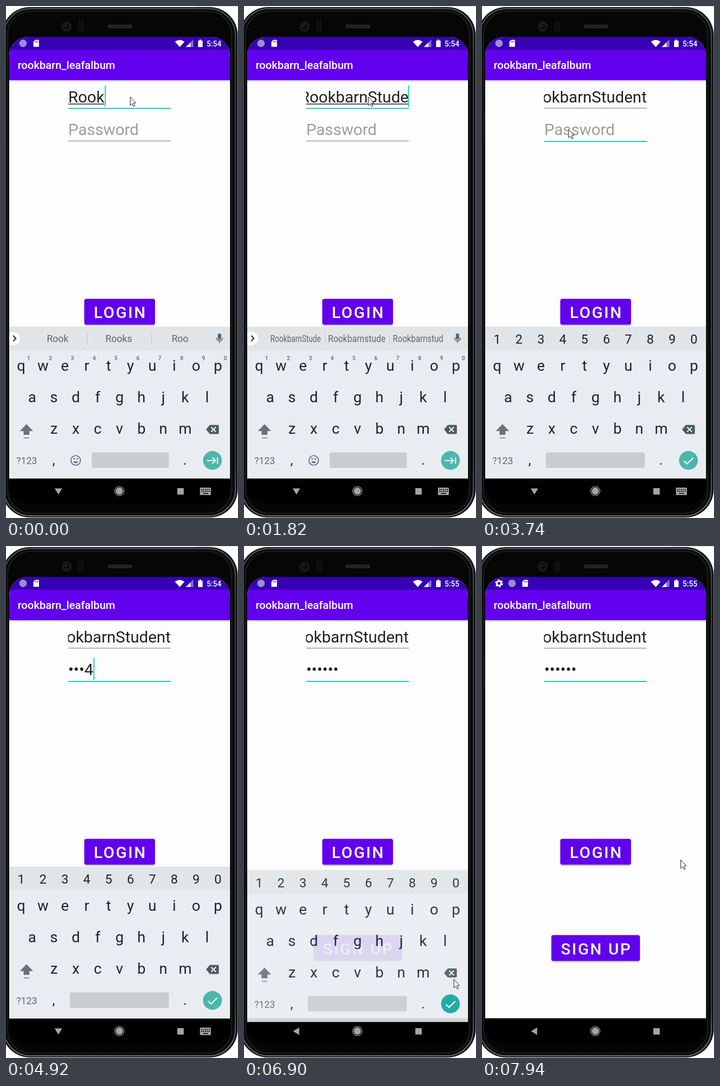
These frames come from a looping animation (436 by 960 pixels, 8 s). An HTML page:

```html
<!DOCTYPE html>
<html lang="en">
<head>
<meta charset="utf-8">
<title>Login form</title>
<style>
html, body { margin: 0; width: 100%; height: 100%; overflow: hidden; background: #fff; }
svg { display: block; width: 436px; height: 960px; font-family: Roboto, Arial, sans-serif; }
text { white-space: pre; }
</style>
</head>
<body>
<svg id="stage" viewBox="0 0 436 960" xmlns="http://www.w3.org/2000/svg">
  <defs>
    <linearGradient id="rim" x1="0" y1="0" x2="0" y2="1">
      <stop offset="0" stop-color="#56595b"/><stop offset=".1" stop-color="#3c3f41"/>
      <stop offset=".9" stop-color="#3c3f41"/><stop offset="1" stop-color="#727577"/>
    </linearGradient>
    <linearGradient id="shade" x1="0" y1="0" x2="0" y2="1">
      <stop offset="0" stop-color="#000" stop-opacity=".22"/><stop offset="1" stop-color="#000" stop-opacity="0"/>
    </linearGradient>
    <clipPath id="screen"><rect x="6" y="58" width="415" height="876" rx="35"/></clipPath>
    <clipPath id="field"><rect x="116.500" y="145" width="193.500" height="110"/></clipPath>
  </defs>

  <path d="M357.500 0V3M357 .5H436M433 34.500H436" stroke="#d8d8d8" fill="none"/>
  <rect x="-8" y="2" width="443.500" height="957" rx="53" fill="#111213"/>
  <rect x="-4" y="5" width="435" height="951" rx="50" fill="#090a0a" stroke="url(#rim)" stroke-width="2"/>
  <rect x="3" y="10" width="421" height="941" rx="44" fill="#060606" stroke="#222425" stroke-width="1.500"/>
  <circle cx="114" cy="38.500" r="10" fill="#151617"/>
  <circle cx="114" cy="38.500" r="5.500" fill="#07090a" stroke="#24282a"/>
  <circle cx="112.500" cy="37" r="1.500" fill="#3d4447"/>
  <rect x="136.500" y="29" width="9" height="19" rx="3" fill="#0d0e0e" stroke="#191a1b"/>
  <rect x="191" y="35" width="46" height="6.500" rx="3" fill="#2a2b2c"/>
  <path d="M194 38.300H234" stroke="#101010" stroke-width="3" stroke-dasharray="1 1"/>

  <g clip-path="url(#screen)">
    <rect x="6" y="58" width="415" height="828" fill="#fdfdfd"/>
    <rect x="6" y="58" width="415" height="24.500" fill="#3700b3"/>
    <rect x="6" y="82" width="415" height="57" fill="#6200ee"/>
    <rect x="6" y="139" width="415" height="4" fill="url(#shade)"/>
    <text x="22" y="118" font-size="20.500" font-weight="500" fill="#fff">rookbarn_leafalbum</text>

    <g id="gear" fill="none" stroke="#fff">
      <circle cx="32" cy="70" r="4.200" stroke-width="3"/>
      <circle cx="32" cy="70" r="6.200" stroke-width="2.400" stroke-dasharray="3.250 3.243"/>
    </g>
    <g id="notes">
      <circle cx="32" cy="70" r="6.800" fill="#8f78cf"/>
      <g fill="none" stroke="#d5ccf0">
        <circle cx="32" cy="70" r="6.300" stroke-dasharray="1.300 .7"/>
        <circle cx="32" cy="70" r="4" stroke-dasharray="1.200 .8"/>
        <circle cx="32" cy="70" r="1.800" stroke-dasharray="1 .8"/>
      </g>
      <path d="M55 63.500H62V76.500H51.500V67Z" fill="#fff"/>
      <path d="M55.500 65.500V68.500M57.700 65.500V68.500M59.900 65.500V68.500" stroke="#3700b3"/>
    </g>
    <path d="M317.500 67Q326.500 60 335.500 67L326.500 77Z" fill="#fff"/>
    <path d="M352 63V77H338Z" fill="#8b6fd2"/>
    <path d="M346.500 68.500V77H338Z" fill="#fff"/>
    <path d="M361 65H363.500V63H367V65H369.500V77H361Z" fill="#fff"/>
    <text id="clock" x="377" y="76" font-size="14" font-weight="500" fill="#fff"></text>

    <g clip-path="url(#field)" font-size="30">
      <text id="user" y="181" fill="#212121"></text>
      <rect id="compose" y="183" height="1.500" fill="#222"/>
      <text id="pass" x="117" y="242"></text>
    </g>
    <rect id="userLine" x="117" y="191" width="193"/>
    <rect id="passLine" x="117" width="193"/>
    <rect id="caret" width="2" fill="#14d3c2"/>

    <g id="buttons" font-size="30" font-weight="500" letter-spacing="2.680"></g>
    <rect x="6" y="885.500" width="415" height="49" fill="#000"/>
    <g id="board"></g>

    <g fill="#a5a5a5">
      <path id="back" d="M91.500 904.500H105.500L98.500 916Z"/>
      <circle cx="213" cy="909.500" r="6.700"/>
      <circle cx="213" cy="909.500" r="8.700" fill="none" stroke="#a5a5a5" stroke-width="1.300"/>
      <rect x="322" y="904" width="12" height="12"/>
      <g id="switcher">
        <rect x="364.500" y="903" width="20.500" height="14" rx="1.500"/>
        <path d="M367 906.500H383M367 910H383" stroke="#000" stroke-width="1.800" stroke-dasharray="1.900 1.600"/>
        <path d="M370 914H380" stroke="#000" stroke-width="1.600"/>
      </g>
    </g>
  </g>
  <path id="mouse" d="M.5 .5V16.500L4.200 13L6.700 18.500L9 17.500L6.600 12H11Z" fill="#fff" stroke="#222"/>
</svg>
<script>
const LOOP = 8000, TICK = 130, MID = 213.4;
const FOCUS = 3220, SWITCH = 3370, LEAVE = 6900, GONE = 7020;
const INK = "#14262e", DIM = "#5b686f", TEAL = "#14d3c2";

const $ = id => document.getElementById(id);
const set = (el, attrs) => { for (const k in attrs) el.setAttribute(k, attrs[k]); };
const show = (el, on) => el.setAttribute("visibility", on ? "inherit" : "hidden");
const clamp = (v, lo, hi) => Math.min(hi, Math.max(lo, v));
const label = (s, x, y, size, fill, more = "") =>
  `<text x="${x}" y="${y}" font-size="${size}" fill="${fill}" text-anchor="middle" ${more}>${s}</text>`;

// Keys sit on a common pitch, each row centred on the screen
const row = (keys, y, size, dx = 0, fill = INK, more = "") => [...keys].map((k, i) =>
  label(k, MID + dx + (i - (keys.length - 1) / 2) * 41.1, y, size, fill, more)).join("");

const button = (s, y, w) =>
  `<rect x="${213.6 - w / 2}" y="${y + 2}" width="${w}" height="49" rx="4" opacity=".2"/>` +
  `<rect x="${213.6 - w / 2}" y="${y}" width="${w}" height="48.500" rx="4" fill="#6200ee"/>` +
  label(s, 214.9, y + 36, 30, "#fff");

$("buttons").innerHTML = button("LOGIN", 549, 133) + button("SIGN UP", 729.5, 166.5);

$("board").innerHTML = `
  <rect x="6" y="601" width="415" height="285" fill="#e9edf1"/>
  <rect x="6" y="601" width="415" height="44.500" fill="#e1e5e8"/>
  ${row("qwertyuiop", 684, 28)}${row("asdfghjkl", 743, 28)}${row("zxcvbnm", 802, 28)}
  <path d="M38.500 784L51 797H44V804H33V797H26Z" fill="#65757d"/>
  <rect x="33.500" y="809" width="10" height="1.500" fill="#65757d"/>
  <path d="M383 785.500H398Q400 785.500 400 787.500V800.500Q400 802.500 398 802.500H383L376 794Z" fill="#4b5b63"/>
  <path d="M385.500 789.500L394.500 798.500M394.500 789.500L385.500 798.500" stroke="#fff" stroke-width="1.800"/>
  ${label("?123", 39, 859, 18, DIM)}${label(",", 89.5, 860, 26, INK)}${label(".", 336.5, 860, 26, INK)}
  <rect id="space" y="837" height="29" rx="3" fill="#c9cdd0"/>
  <circle id="enter" cx="388" cy="852" r="17.700"/>
  <g id="words">
    <path d="M6 611H14A12.500 12.500 0 0 1 14 636H6Z" fill="#fff"/>
    <path d="M13.500 618L18.500 623.300L13.500 628.600" fill="none" stroke="#222" stroke-width="2"/>
    <path d="M152.500 611V636M273.500 611V636" stroke="#c3c8cb"/>
    <rect x="398" y="614" width="6.500" height="11.500" rx="3.200" fill="${DIM}"/>
    <path d="M395.500 622A5.700 5.700 0 0 0 407 622M401.300 628V632" fill="none" stroke="${DIM}" stroke-width="1.600"/>
    ${[0, 1, 2].map(i => label("", 0, 0, 18, DIM, `id="word${i}"`)).join("")}
    ${row("1234567890", 664, 10.5, 14, DIM, 'font-weight="500"')}
    <circle cx="131" cy="852" r="9" fill="none" stroke="${DIM}" stroke-width="1.700"/>
    <path d="M126.500 854A4.800 4.800 0 0 0 135.500 854Z" fill="${DIM}"/>
    <circle cx="128" cy="849" r="1.500" fill="${DIM}"/><circle cx="134" cy="849" r="1.500" fill="${DIM}"/>
    <path d="M377.500 852.300H393M388 846.500L393.700 852.300L388 858M397.500 846V858.500" fill="none" stroke="#fff" stroke-width="2"/>
  </g>
  <g id="digits">
    ${row("1234567890", 633, 24)}
    <path d="M379.500 853L385.500 858.500L397 847" fill="none" stroke="#fff" stroke-width="2.200"/>
  </g>`;

// Typing comes in bursts of evenly spaced keystrokes
const burst = (start, gap, n) => t => {
  const count = clamp(Math.floor((t - start) / gap) + 1, 0, n);
  return { count, last: count ? start + gap * (count - 1) : -250 };
};
const bursts = [burst(530, 120, 4), burst(1300, 130, 7), burst(4140, 240, 6)];

const NAME = "RookbarnStudent";
const HINTS = {
  4: "Rook,Rooks,Roo", 5: "Rookb,Rooks,Rook b", 6: "Rookba,Rooks a,Rook ba",
  7: "Rookbar,Rookbars,Rook bar", 8: "Rookbarn,Rookbar,Rook an"
};

// Stops of the pointer: time, x, y
const STOPS = [[2480, 233, 170], [3070, 134, 228], [3620, 161.5, 229], [5440, 205, 337],
  [5600, 219, 379], [5990, 219, 379], [6120, 409, 649], [6250, 416, 723], [6640, 384, 852],
  [6900, 394, 812], [7030, 388, 654], [7550, 364, 635], [7940, 373, 588]];

function pointer(t) {
  const i = clamp(STOPS.findIndex(s => s[0] > t), 0, STOPS.length);
  if (t >= STOPS[STOPS.length - 1][0]) return STOPS[STOPS.length - 1].slice(1);
  if (!i) return STOPS[0].slice(1);
  const [a, b] = [STOPS[i - 1], STOPS[i]], p = (t - a[0]) / (b[0] - a[0]);
  return [1, 2].map(k => a[k] + (b[k] - a[k]) * p);
}

function suggestions(n) {
  if (HINTS[n]) return HINTS[n].split(",");
  const s = NAME.slice(0, n), low = s[0] + s.slice(1).toLowerCase();
  return [s, low, low.slice(0, -1)];
}

function drawFields(t, n, keys) {
  const inPass = t >= SWITCH, lit = t >= FOCUS, k = keys[2].count;
  const user = $("user"), pass = $("pass");
  user.textContent = NAME.slice(0, n);
  const w = user.getComputedTextLength(), x = 117 - Math.max(0, w - 192.5);
  set(user, { x });
  set($("compose"), { x, width: w });
  show($("compose"), !inPass);
  set($("userLine"), inPass ? { height: 1, fill: "#777" } : { height: 2, fill: TEAL });
  set($("passLine"), lit ? { y: 253, height: 2, fill: TEAL } : { y: 252.2, height: 1.7, fill: "#adadad" });

  // The newest digit stays readable for a moment
  const masked = k === 6 && t - keys[2].last > 1040;
  pass.textContent = !k ? "Password" : masked ? "•".repeat(k) : "•".repeat(k - 1) + k;
  set(pass, { fill: k ? "#212121" : "#9e9e9e" });

  const passX = 117 + (k ? pass.getComputedTextLength() : 0);
  set($("caret"), inPass ? { x: passX, y: 210, height: 41 }
    : { x: Math.min(x + w + .7, 308.3), y: 149, height: 40 });
  const touched = Math.max(lit ? FOCUS : -250, ...keys.map(b => b.last));
  show($("caret"), (t - touched) % 1000 < 500);
}

function drawBoard(t, n) {
  const digits = t >= SWITCH, leaving = t >= LEAVE;
  show($("words"), !digits);
  show($("digits"), digits);
  set($("space"), digits ? { x: 120, width: 186 } : { x: 161, width: 145 });
  set($("enter"), { fill: leaving ? "#0ba59b" : "#4db6ac" });
  set($("board"), { transform: `translate(0 ${leaving ? 6.5 : 0})`, opacity: leaving ? .9 : 1 });
  show($("board"), t < GONE);
  show($("switcher"), !leaving);
  set($("back"), { transform: leaving ? "rotate(90 98.500 909.700)" : "" });
  if (digits) return;
  suggestions(n).forEach((s, i) => {
    const el = $("word" + i), room = i === 1 ? 108 : 95;
    el.textContent = s;
    const fit = Math.min(1, room / el.getComputedTextLength());
    set(el, { transform: `translate(${97 + i * 115} 630) scale(${fit} 1)` });
  });
}

function draw(t) {
  const step = 10 + TICK * Math.floor((t - 10) / TICK);
  const keys = bursts.map(b => b(t)), n = 4 + keys[0].count + keys[1].count;
  $("clock").textContent = t < 5170 ? "5:54" : "5:55";
  drawFields(t, n, keys);
  drawBoard(t, n);
  set($("mouse"), { transform: `translate(${pointer(step)})` });
  show($("mouse"), t < 4140 || t >= 5440);
  const p = clamp((step - 7030) / 650, 0, 1);
  set($("notes"), { transform: `translate(${24.3 * p} 0)` });
  set($("gear"), { opacity: p, transform: `translate(${32 - 32 * p} ${70 - 70 * p}) scale(${p})` });
}

const start = performance.now();
function tick() {
  draw((performance.now() - start) % LOOP);
  requestAnimationFrame(tick);
}
tick();
</script>
</body>
</html>
```
